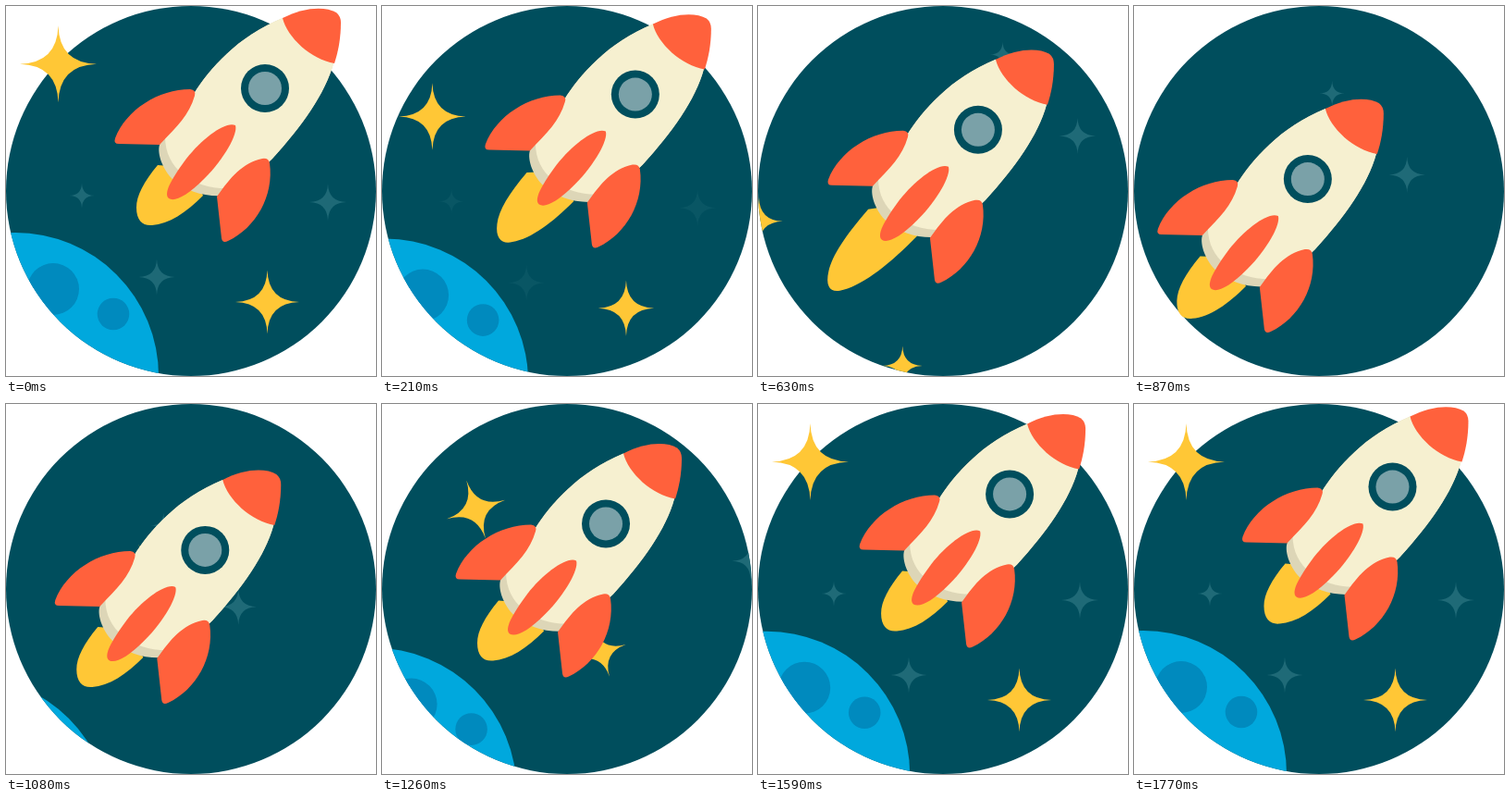
An HTML page with a canvas that plays this animation: 400 px wide and 400 px high, repeating every 1800 ms.

```html
<!DOCTYPE html>
<html lang="en">
<head>
<meta charset="utf-8">
<title>Rocket</title>
<style>
  html, body { margin: 0; width: 100%; height: 100%; overflow: hidden; background: #fff; }
  canvas { display: block; width: 400px; height: 400px; }
</style>
</head>
<body>
<canvas id="stage" width="400" height="400"></canvas>
<script>
const ctx = document.getElementById('stage').getContext('2d');
const LOOP = 1800, HALF = 900;
const NIGHT = '#004e5d', CREAM = '#f6f0d0', SHADE = '#ddd6b7', RED = '#ff613c',
      GOLD = '#ffc736', MOON = '#00a8dd', CRATER = '#008abe', DIM = '#1f6a77', GLASS = '#7aa1a8';
const AXIS = Math.atan2(0.729, -0.685);

const shape = {
  flame: new Path2D('M164 172C149 190 141 205 141 218C141 232 148 238 158 237C176 236 195 223 213 205L200 175Z'),
  leftFin: new Path2D('M166 150L122 149Q116 149 118 143C130 112 165 90 199 90Q206 91 204 97C198 118 185 130 166 150Z'),
  rightFin: new Path2D('M228 206L233 251Q234 257 240 254C270 240 290 205 285 170Q284 164 277 165C255 170 243 185 228 206Z'),
  hull: new Path2D('M299 13C250 33 220 68 203 95C185 122 170 140 166 150C163 160 170 178 181 188C195 200 215 207 237 205C260 190 275 178 288 165C320 130 345 95 354 62Z'),
  skin: new Path2D('M299 13C250 33 220 68 203 95C190 115 178 130 172 141C172 160 180 172 190 181C205 193 222 198 244 197C260 188 275 178 288 165C320 130 345 95 354 62Z'),
  nose: new Path2D('M299 13C322 1 345 0 357 7Q362 11 362 18C362 35 359 50 355 62C330 58 304 34 299 13Z'),
  midFin: new Path2D('M248 129C251 138 236 165 215 186C195 206 182 212 176 208C170 203 178 188 195 165C213 142 238 124 248 129Z')
};

// Monotone cubic curve through [time, value] pairs
function curve(keys) {
  const n = keys.length - 1;
  const slope = i => (keys[i + 1][1] - keys[i][1]) / (keys[i + 1][0] - keys[i][0]);
  const tangent = keys.map((k, i) => {
    if (i === 0 || i === n) return 0;
    const a = slope(i - 1), b = slope(i);
    return a * b > 0 ? 2 * a * b / (a + b) : 0;
  });
  return t => {
    if (t <= keys[0][0]) return keys[0][1];
    if (t >= keys[n][0]) return keys[n][1];
    let i = 0;
    while (t > keys[i + 1][0]) i++;
    const [t0, v0] = keys[i], [t1, v1] = keys[i + 1];
    const d = t1 - t0, s = (t - t0) / d, r = 1 - s;
    return v0 * r * r * (1 + 2 * s) + v1 * s * s * (3 - 2 * s)
      + d * s * r * (tangent[i] * r - tangent[i + 1] * s);
  };
}

const retreat = curve([[0, 0], [420, 27.6], [630, 61.2], [870, 134.4], [900, 137], [1080, 94.7], [1440, 25.8], [1770, 0.8], [1800, 0]]);
const thrust = curve([[0, 0], [420, 0.98], [525, 1.03], [630, 0.98], [870, 0.11], [930, 0]]);
const gather = curve([[980, 1], [1080, 0.86], [1440, 0.047], [1580, 0]]);

function fill(path, color) {
  ctx.fillStyle = color;
  ctx.fill(path);
}

function disc(x, y, r, color) {
  ctx.fillStyle = color;
  ctx.beginPath();
  ctx.arc(x, y, r, 0, Math.PI * 2);
  ctx.fill();
}

function star(x, y, r, color, angle = 0) {
  const c = r * 0.03;
  ctx.save();
  ctx.translate(x, y);
  ctx.rotate(angle);
  ctx.beginPath();
  ctx.moveTo(0, -r);
  ctx.quadraticCurveTo(c, -c, r, 0);
  ctx.quadraticCurveTo(c, c, 0, r);
  ctx.quadraticCurveTo(-c, c, -r, 0);
  ctx.quadraticCurveTo(-c, -c, 0, -r);
  ctx.fillStyle = color;
  ctx.fill();
  ctx.restore();
}

function clipSky() {
  ctx.beginPath();
  ctx.arc(200, 200, 200, 0, Math.PI * 2);
  ctx.clip();
}

function drawDimStars(t) {
  let dx, dy;
  ctx.save();
  if (t < 400) {
    const u = t / HALF;
    ctx.globalAlpha = Math.max(0, 1 - t / 300);
    dx = -125 * u * u;
    dy = 115 * u * u;
  } else {
    const left = Math.max(0, 1502 - t);
    dx = 0.2095 * left;
    dy = -0.175 * left;
  }
  for (const [x, y, r] of [[82, 205, 13.5], [348, 212, 20], [163, 293, 19.5]]) star(x + dx, y + dy, r, DIM);
  ctx.restore();
}

function drawMoon(t) {
  const shift = t < HALF ? 174 * (t / HALF) ** 2 : 154 * (2 - t / HALF) ** 3.4;
  ctx.save();
  ctx.translate(-0.72 * shift, 0.69 * shift);
  disc(10, 400, 155, MOON);
  disc(51, 306, 28, CRATER);
  disc(116, 333, 17.3, CRATER);
  ctx.restore();
}

function drawGoldStars(t) {
  if (t < HALF) {
    const u = t / HALF, size = 1 - 0.54 * u;
    star(56.5 - 161 * u ** 3, 62.5 + 243 * u, 41.5 * size, GOLD);
    star(282.5 - 235 * u ** 1.75, 320 + 147 * u ** 2.13, 34.5 * size, GOLD);
  } else if (t > 980) {
    // Both fly out from a point behind the rocket
    const r = gather(t), size = 1 - 0.5 * r, spin = Math.PI * r;
    star(56.5 + 113 * r, 62.5 + 129 * r, 41.5 * size, GOLD, spin);
    star(282.5 - 113 * r, 320 - 129 * r, 34.5 * size, GOLD, spin);
  }
}

function drawRocket(t) {
  const d = retreat(t);
  ctx.save();
  ctx.translate(-0.685 * d, 0.729 * d);

  ctx.save();
  ctx.translate(190, 187);
  ctx.rotate(AXIS);
  ctx.scale(1 + 0.6 * thrust(t), 1);
  ctx.rotate(-AXIS);
  ctx.translate(-190, -187);
  fill(shape.flame, GOLD);
  ctx.restore();

  fill(shape.hull, SHADE);
  fill(shape.skin, CREAM);
  fill(shape.nose, RED);
  fill(shape.leftFin, RED);
  fill(shape.rightFin, RED);
  fill(shape.midFin, RED);
  disc(280, 89, 26, NIGHT);
  disc(280, 89, 18, GLASS);
  ctx.restore();
}

function draw(t) {
  ctx.fillStyle = '#fff';
  ctx.fillRect(0, 0, 400, 400);
  disc(200, 200, 200, NIGHT);

  ctx.save();
  clipSky();
  drawDimStars(t);
  drawMoon(t);
  ctx.restore();

  ctx.save();
  if (t > 400 && t < HALF) clipSky();
  drawGoldStars(t);
  ctx.restore();

  drawRocket(t);
}

const start = performance.now();
function tick() {
  draw((performance.now() - start) % LOOP);
  requestAnimationFrame(tick);
}
tick();
</script>
</body>
</html>
```
